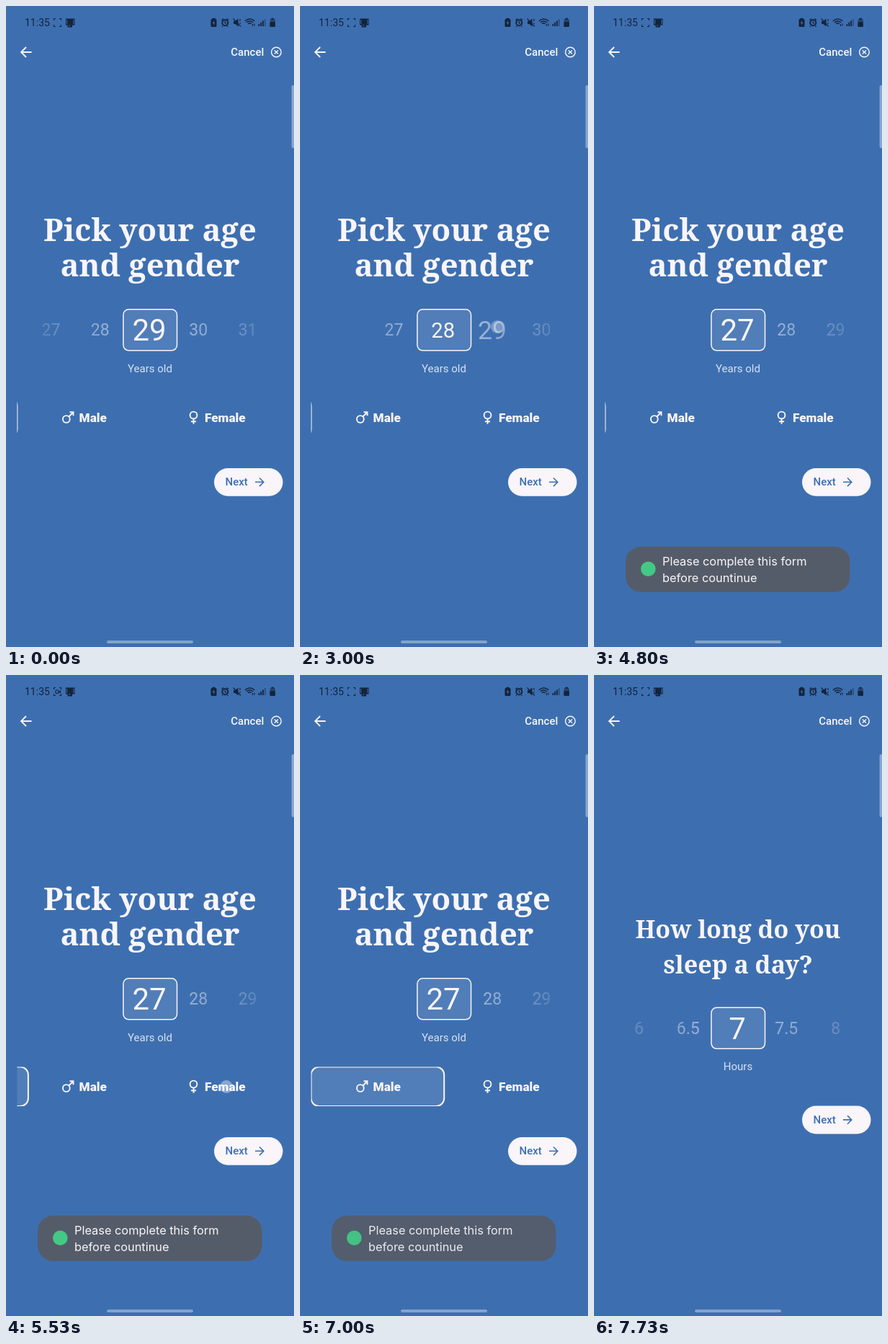
Animation, 400 px wide and 889 px high, one loop 8000 ms. Source, as an HTML page with a canvas:

```html
<!DOCTYPE html>
<html lang="en">
<head>
<meta charset="utf-8">
<title>Age and gender form</title>
<style>
html, body { margin: 0; width: 100%; height: 100%; overflow: hidden; background: #3d6fb0; }
canvas { display: block; width: 400px; height: 889px; }
</style>
</head>
<body>
<canvas id="stage"></canvas>
<script>
const LOOP = 8000, W = 400, H = 889, STEP = 68.3;
const BLUE = '#3d6fb0', LIGHT = '#f9f5f9', INK = '#14243d';
const SANS = 'Roboto, sans-serif', SERIF = '"Noto Serif", serif';
const canvas = document.getElementById('stage');
const c = canvas.getContext('2d');
const dpr = window.devicePixelRatio || 1;
canvas.width = W * dpr;
canvas.height = H * dpr;

const clamp = v => Math.max(0, Math.min(1, v));
const ramp = (t, a, b) => clamp((t - a) / (b - a));
const smooth = (t, a, b) => { const p = ramp(t, a, b); return p * p * (3 - 2 * p); };
const mix = (a, b, p) => a + (b - a) * p;
const white = a => `rgba(255,255,255,${a})`;

function text(str, x, y, font, color = LIGHT, align = 'left') {
  c.font = font;
  c.fillStyle = color;
  c.textAlign = align;
  c.fillText(str, x, y);
}
function box(x, y, w, h, r, fill, stroke, line = 1.5) {
  c.beginPath();
  c.roundRect(x, y, w, h, r);
  if (fill) { c.fillStyle = fill; c.fill(); }
  if (stroke) { c.strokeStyle = stroke; c.lineWidth = line; c.stroke(); }
}
function path(d, color, line) {
  const p = new Path2D(d);
  if (line) { c.strokeStyle = color; c.lineWidth = line; c.stroke(p); }
  else { c.fillStyle = color; c.fill(p); }
}
function ring(x, y, r, color, line) {
  c.beginPath();
  c.arc(x, y, r, 0, 7);
  if (line) { c.strokeStyle = color; c.lineWidth = line; c.stroke(); }
  else { c.fillStyle = color; c.fill(); }
}

function statusBar(t) {
  text('11:35', 26, 28, '14px ' + SANS, INK);
  path('M66.5 20v-2.5h2.5M74 17.5h2.5v2.5M76.5 26v2.5H74M69 28.5h-2.5V26', INK, 1.1);
  const blink = t % 1000;
  c.globalAlpha = blink < 670 ? ramp(blink, 60, 190) : 0;
  box(69, 21, 4, 4.5, 1, null, INK, 1.2);
  path('M74 22.2l2-1v4l-2-1z', INK);
  c.globalAlpha = 1;
  path('M83 17.5h12.5v9H92v3h-6.5v-3H83z', INK);
  path('M84.5 19v6M94 19v6', BLUE, 1);
  path('M88 26v2', BLUE, 1);

  box(284.5, 18, 8, 11, 1.5, INK);
  box(286.5, 16.8, 4, 2, 0.5, INK);
  path('M289 20l-2.2 4h1.6l-.5 3 2.5-4h-1.6z', BLUE);
  ring(304.3, 23.3, 4, INK, 2);
  path('M299.5 19.5l2.5-2M309 19.5l-2.5-2M304.3 21v2.5l1.8 1M301 28l-1 1M307.5 28l1 1', INK, 1.3);
  path('M316 21h2.5l4-3.5v11l-4-3.5H316z', INK);
  path('M315.5 17.5l10.5 11M325 18v3M325 23v2', INK, 1.2);
  for (const r of [3, 6, 9]) {
    c.beginPath();
    c.arc(338.5, 27, r, -2.4, -0.74);
    c.strokeStyle = INK;
    c.lineWidth = 1.5;
    c.stroke();
  }
  path('M342.5 25v3M345 24.5v3', INK, 1.2);
  for (let i = 0; i < 4; i++) {
    c.globalAlpha = i < 3 ? 1 : 0.45;
    c.fillStyle = INK;
    c.fillRect(350.5 + i * 2.8, 25 - i * 2.3, 1.8, 3 + i * 2.3);
  }
  c.globalAlpha = 0.55;
  box(366.5, 18, 7.5, 11, 1.5, INK);
  c.globalAlpha = 1;
  box(366.5, 22, 7.5, 7, 1.5, INK);
  box(368.5, 16.8, 3.5, 2, 0.5, INK);
}

function chrome() {
  path('M35.5 64H21.5M28 57l-7 7 7 7', LIGHT, 1.8);
  text('Cancel', 312.3, 69, '500 15px ' + SANS);
  ring(375.4, 64, 6.8, LIGHT, 1.4);
  path('M372.8 61.4l5.2 5.2M378 61.4l-5.2 5.2', LIGHT, 1.4);
  box(396.6, 110, 6, 87, 2, 'rgba(166,184,216,.75)');
  box(140, 880, 120, 4, 2, 'rgba(190,205,232,.55)');
}

// Values dim towards both ends of the strip.
function stripFill() {
  const g = c.createLinearGradient(20, 0, 380, 0);
  const stops = [[20, 0], [63, .22], [131, .46], [161, .55], [166, 1]];
  for (const [x, a] of stops) {
    g.addColorStop((x - 20) / 360, `rgba(249,245,249,${a})`);
    g.addColorStop((380 - x) / 360, `rgba(249,245,249,${a})`);
  }
  return g;
}
function picker(values, pos, focus, y, unit) {
  box(162.9, y - 28.4, 74.6, 57, 7.5, white(.1), LIGHT);
  const fill = stripFill();
  values.forEach((v, i) => {
    const x = 199 + (i - pos) * STEP;
    if (x < 40 || x > 360) return;
    const size = mix(23, 42, clamp(1 - Math.abs(i - focus)));
    text(v, x, y + size * 0.356, `${size}px ${SANS}`, fill, 'center');
  });
  text(unit, 200, y + 58.6, '15px ' + SANS, white(.8), 'center');
}
function nextButton(y) {
  box(289, y, 95.5, 38.8, 19.4, LIGHT);
  text('Next', 304.5, y + 24.4, '500 15px ' + SANS, BLUE);
  path(`M346 ${y + 19.3}h11.5M352 ${y + 13.5}l5.8 5.8-5.8 5.8`, BLUE, 1.6);
}

// The sliding marker is cut off at the edges of the row.
function genderRow(t) {
  const slot = mix(mix(-1, 1, smooth(t, 5494, 5794)), 0, smooth(t, 6530, 6830));
  const x = 15.4, y = 543.5, w = 184.8, h = 54.5;
  c.save();
  c.beginPath();
  c.rect(x, y, w * 2, h);
  c.clip();
  box(x + slot * w, y, w, h, 11, white(.1), LIGHT, 2);
  c.restore();
  ring(83.8, 573, 4.9, LIGHT, 1.9);
  path('M87.3 569.5l6-6M88.5 563.3h5v5', LIGHT, 1.9);
  text('Male', 101.6, 576.6, '800 17.2px ' + SANS);
  ring(260.5, 567.5, 4.9, LIGHT, 1.9);
  path('M260.5 572.4v7.4M257 576.3h7', LIGHT, 1.9);
  text('Female', 276, 576.6, '800 17.2px ' + SANS);
}

function title(lines, y, size) {
  lines.forEach((line, i) => text(line, 200, y + i * 48.8, `700 ${size}px ${SERIF}`, LIGHT, 'center'));
}
function agePage(t) {
  title(['Pick your age', 'and gender'], 326.3, 43.6);
  const pos = 2 - smooth(t, 2720, 3010) - smooth(t, 3380, 3670);
  const focus = 2 - ramp(t, 2925, 3155) - ramp(t, 3580, 3810);
  picker(['27', '28', '29', '30', '31'], pos, focus, 449.2, 'Years old');
  genderRow(t);
  nextButton(641);
}
function sleepPage() {
  title(['How long do you', 'sleep a day?'], 365.4, 34);
  picker(['6', '6.5', '7', '7.5', '8'], 2, 2, 489.7, 'Hours');
  nextButton(597.6);
}

function toast(t) {
  c.globalAlpha = ramp(t, 4560, 4800) * (1 - ramp(t, 6980, 7280));
  if (c.globalAlpha === 0) { c.globalAlpha = 1; return; }
  box(44, 749.8, 311.5, 63, 21, '#555c69');
  ring(75.3, 780.8, 10.3, '#43c985');
  const font = '16.35px Inter, sans-serif';
  text('Please complete this form', 95, 776.2, font);
  text('before countinue', 95, 798.6, font);
  c.globalAlpha = 1;
}

// Touches: down, up, start x, start y, end x, end y.
const touches = [
  [1320, 1500, 226, 56, 226, 56],
  [2670, 2930, 204, 446, 274, 445],
  [3330, 3590, 204, 446, 274, 445],
  [4400, 4500, 330, 661, 330, 661],
  [5400, 5480, 306, 571, 306, 571],
  [6400, 6510, 112, 571, 112, 571],
  [7200, 7300, 330, 661, 330, 661]
];
function touchDots(t) {
  for (const [down, up, x0, y0, x1, y1] of touches) {
    if (t < down) continue;
    const a = 0.6 * (1 - ramp(t, up, up + 150));
    const p = ramp(t, down, up);
    if (a > 0) ring(mix(x0, x1, p), mix(y0, y1, p), 9, `rgba(250,248,252,${a})`);
  }
}

function draw(t) {
  c.setTransform(dpr, 0, 0, dpr, 0, 0);
  c.fillStyle = BLUE;
  c.fillRect(0, 0, W, H);
  const turn = smooth(t, 7320, 7720);
  [agePage, sleepPage].forEach((page, i) => {
    const x = (i - turn) * W;
    if (Math.abs(x) >= W) return;
    c.save();
    c.translate(x, 0);
    page(t);
    c.restore();
  });
  statusBar(t);
  chrome();
  toast(t);
  touchDots(t);
}

const start = performance.now();
function tick() {
  draw((performance.now() - start) % LOOP);
  requestAnimationFrame(tick);
}
tick();
</script>
</body>
</html>
```
